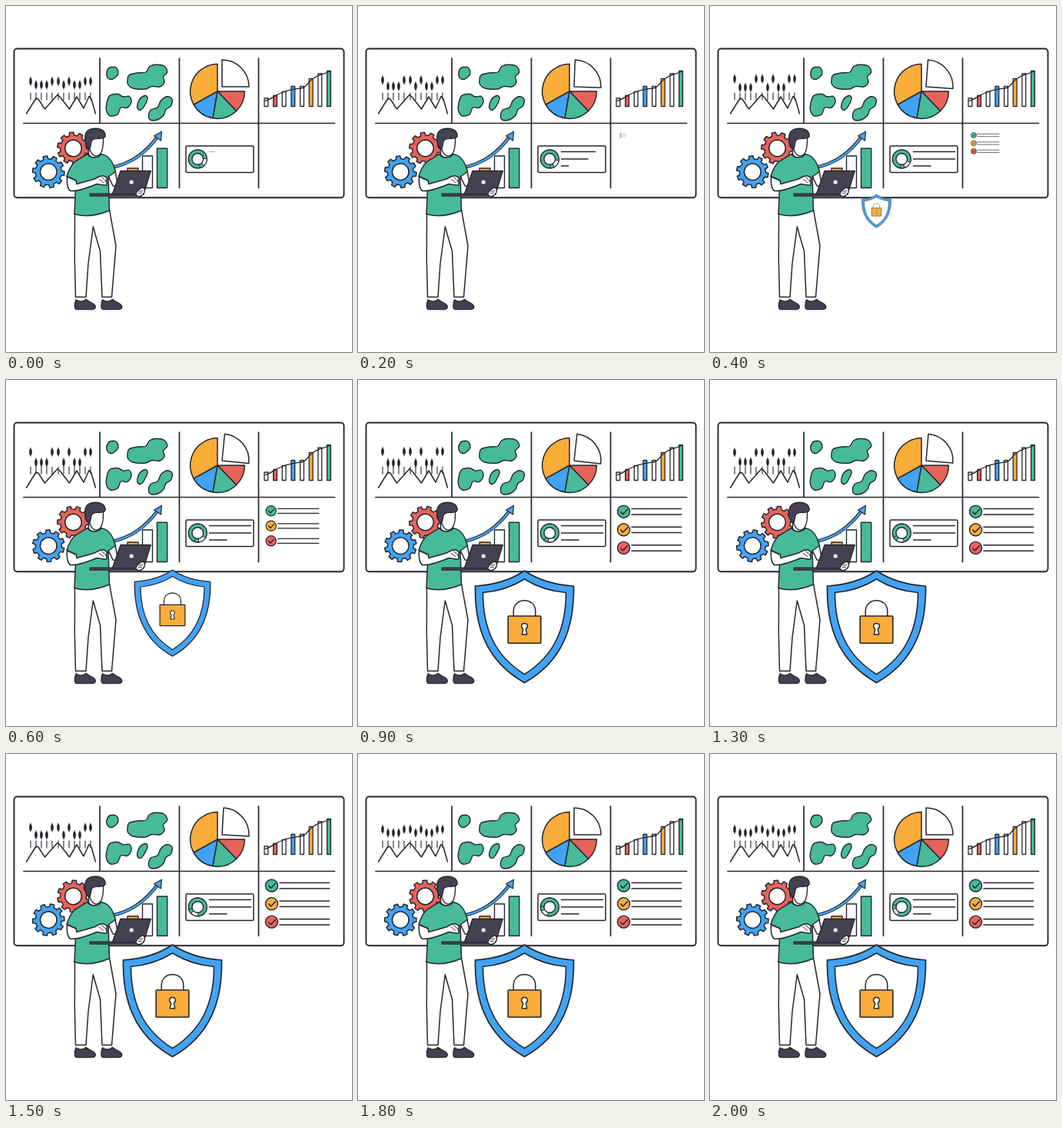
An HTML page with a canvas for the animation above (2.1 s loop, 450 by 450 pixels).

```html
<!DOCTYPE html>
<html lang="en">
<head>
<meta charset="utf-8">
<title>Data dashboard</title>
<style>
html, body { margin: 0; width: 100%; height: 100%; overflow: hidden; background: #fff; }
canvas { display: block; width: 450px; height: 450px; }
</style>
</head>
<body>
<canvas id="stage"></canvas>
<script>
const LOOP = 2100, STEP = 100, TAU = Math.PI * 2;
const INK = '#26262e', DARK = '#434253', WHITE = '#fff';
const GREEN = '#47bb99', BLUE = '#42a3f5', RED = '#e7635a', YELLOW = '#faad38';

const canvas = document.getElementById('stage');
const dpr = window.devicePixelRatio || 1;
canvas.width = canvas.height = Math.round(450 * dpr);
const c = canvas.getContext('2d');

const rad = deg => deg * Math.PI / 180;

function smooth(t, from, to) {
  const p = Math.min(1, Math.max(0, (t - from) / (to - from)));
  return p * p * (3 - 2 * p);
}

function paint(path, fill, width = 1.5) {
  if (fill) { c.fillStyle = fill; c.fill(path); }
  if (width) { c.lineWidth = width; c.strokeStyle = INK; c.stroke(path); }
}

const shape = (d, fill, width) => paint(new Path2D(d), fill, width);

function circle(x, y, r, fill, width) {
  const p = new Path2D();
  p.arc(x, y, r, 0, TAU);
  paint(p, fill, width);
}

function box(x, y, w, h, fill, width, r = 0) {
  const p = new Path2D();
  p.roundRect(x, y, w, h, r);
  paint(p, fill, width);
}

function slice(x, y, r, from, to, fill, width) {
  const p = new Path2D();
  p.moveTo(x, y);
  p.arc(x, y, r, rad(from), rad(to));
  p.closePath();
  paint(p, fill, width);
}

// closed smooth curve through the given points
function blob(pts) {
  const n = pts.length, get = i => pts[(i + n) % n], p = new Path2D();
  p.moveTo(...pts[0]);
  for (let i = 0; i < n; i++) {
    const [a, b, d, e] = [get(i - 1), get(i), get(i + 1), get(i + 2)];
    p.bezierCurveTo(b[0] + (d[0] - a[0]) / 6, b[1] + (d[1] - a[1]) / 6,
      d[0] - (e[0] - b[0]) / 6, d[1] - (e[1] - b[1]) / 6, d[0], d[1]);
  }
  paint(p, GREEN, 1.4);
}

function at(x, y, draw, scale = 1, angle = 0) {
  if (scale <= 0) return;
  c.save();
  c.translate(x, y);
  c.rotate(angle);
  c.scale(scale, scale);
  draw();
  c.restore();
}

function board() {
  box(10.5, 55.5, 429, 193.7, WHITE, 1.9, 4);
  shape('M23 152.5H427.5M122 68V152.5M225.5 68V236.5M328.5 68V236.5', null, 1.7);
}

function candles(swing) {
  const high = [32, 60, 68, 82, 103, 110], low = [39, 46, 53, 75, 89, 96];
  const draw = (x, y) => {
    shape(`M${x} ${y - 5.5}V${y + 5.5}`, null, 1);
    const p = new Path2D();
    p.ellipse(x, y, 1.5, 4.3, 0, 0, TAU);
    paint(p, INK, 0.6);
  };
  high.forEach(x => draw(x, 98 - 5 * swing));
  low.forEach(x => draw(x, 102.5 + 5.5 * swing));
  [...high, ...low].forEach(x => shape(`M${x} 113V122`, null, 1.1));
  shape('M26.5 140L39 120L42 121L50.5 134L67 115.5L70 118L82.5 134L92 118L101 133L108 117.5L111 121L116.5 140', null, 1.5);
}

function islands() {
  blob([[131, 86], [135, 80], [143, 80], [146, 87], [142, 93], [136, 95.5], [131.5, 92]]);
  blob([[158, 97], [160, 90], [171, 87], [182, 86], [186.5, 79], [195, 76.3], [206, 78.5], [209.7, 86],
    [204.5, 92], [206, 99], [200, 105], [189.5, 104.5], [181, 108], [165, 107], [158.5, 102]]);
  blob([[130.5, 129], [134.5, 117], [145, 114.5], [152.5, 118], [160.5, 117.5], [163, 125], [157.8, 132.4],
    [149.5, 132], [145, 141], [136, 143], [130.8, 137]]);
  blob([[170.8, 129], [174, 121], [181, 116.5], [184, 120], [181, 128], [176, 135], [171.5, 134]]);
  blob([[185.4, 143], [188.6, 135], [197, 132], [201.5, 123], [209.5, 117.8], [216, 121], [214.5, 130],
    [208, 134.5], [205, 142], [198, 147.5], [188.6, 148.5]]);
}

function pie(swing) {
  const parts = [[0, 46, RED], [46, 100, GREEN], [100, 151, BLUE], [151, 270, YELLOW]];
  parts.forEach(([a, b, col]) => slice(275, 111, 35.4, a, b, col, 1.5));
  at(281, 105, () => slice(0, 0, 35, -90, 0, WHITE, 1.5), 1, rad(6.5 * swing));
}

function bars() {
  const tops = [120, 116.5, 111.5, 104.5, 104.5, 94.3, 88, 84.5];
  const cols = [WHITE, RED, WHITE, BLUE, WHITE, YELLOW, WHITE, GREEN];
  tops.forEach((y, i) => box(336 + i * 11.65, y, 4.8, 130.5 - y, cols[i], 1.3));
  shape('M337 123.5C345 121 350 116 358 113C365 109 374 108.5 386 106.5C392 104 394 97 400 94C408 88 414 89 421 85', null, 1.3);
}

function gear(x, y, col, angle) {
  const n = 10, p = new Path2D();
  const ring = [[-0.3, 17], [-0.2, 20.8], [0.2, 20.8], [0.3, 17]];
  for (let i = 0; i < n; i++) {
    for (const [k, r] of ring) {
      const a = (i + k) * TAU / n;
      p.lineTo(r * Math.cos(a), r * Math.sin(a));
    }
  }
  p.closePath();
  at(x, y, () => {
    paint(p, col, 1.5);
    circle(0, 0, 10.8, WHITE, 1.5);
  }, 1, angle);
}

function growth() {
  box(158, 211, 14, 25.5, YELLOW, 1.4);
  box(177.5, 195, 13, 41.5, WHITE, 1.4);
  box(196.5, 185.2, 13.2, 51.3, GREEN, 1.4);
  shape('M137 210C160 206 181 192 198 169', null, 4.6);
  c.strokeStyle = BLUE;
  c.lineWidth = 2.3;
  c.stroke(new Path2D('M137 210C160 206 181 192 197 170.5'));
  shape('M192.5 169L202.5 163.3L201.5 175Z', BLUE, 1.2);
}

function card(t) {
  box(234, 182, 88, 34.5, WHITE, 1.5, 1.5);
  const mid = 25 + t * 0.06;
  circle(249.3, 199, 12, GREEN, 1.4);
  slice(249.3, 199, 12, mid - 28, mid + 22, WHITE, 1);
  slice(249.3, 199, 12, mid + 22, mid + 48, GREEN, 1);
  circle(249.3, 199, 7.3, WHITE, 1.4);
  [[189.5, 54], [199, 54], [208, 22.5]].forEach(([y, w], i) => {
    const k = smooth(t, i * 70 - 90, i * 40 + 310);
    if (!k) return;
    c.globalAlpha = Math.min(1, k * 2.5);
    shape(`M264.5 ${y}h${w * k}`, null, 1.5);
    c.globalAlpha = 1;
  });
}

function checklist(t) {
  at(341, 165.6, () => [GREEN, YELLOW, RED].forEach((col, i) => {
    const y = 5.6 + i * 23.6;
    circle(4.5, y, 8, col, 1.4);
    shape(`M0.8 ${y + 0.3}l2.8 3l5.8 -6.2`, null, 1.5);
    shape(`M15 ${y - 3.6}h64.5M15 ${y + 3.8}h64.5`, null, 1.5);
  }), smooth(t, 65, 792));
}

function shield(t) {
  at(216.5, 244, () => {
    shape('M0 4C-19 17 -41 22.5 -64 24C-65 76 -50 122 0 149.7C50 122 65 76 64 24C41 22.5 19 17 0 4Z', BLUE, 1.7);
    shape('M0 15C-17 25.5 -36 31 -54 32.5C-54 77 -40 114 0 138.7C40 114 54 77 54 32.5C36 31 17 25.5 0 15Z', WHITE, 1.6);
    shape('M-14.3 63V57C-14.3 38 14.3 38 14.3 57V63', WHITE, 1.5);
    box(-21.3, 63, 42.6, 35.3, YELLOW, 1.6, 0.8);
    shape('M-1.8 80C-5.5 77 -4 72.5 0 72.5C4 72.5 5.5 77 1.8 80L3.2 87H-3.2Z', WHITE, 1.4);
  }, smooth(t, 180, 790));
}

function person() {
  // legs and shoes
  shape('M89.5 268L89.3 330L90.5 378.5H104L107 335L113.3 287L122.5 319L125 378.5H137.5L143 312L134.5 265Z', WHITE);
  at(0, 0, shoe);
  at(34.5, 0, shoe);
  // far arm
  shape('M133 221L139 234L146 235L142 215Z', WHITE);
  // neck and shirt
  shape('M107.5 182V193C110 199 120 199 123 193V186Z', WHITE);
  shape('M106 192.5C100 196 93 200 89 203C84 208 81 215 79 221.5L91 227L89 270.5C103 275 120 272 134.5 266L133 222L142.5 215.5C140 206 137 200 132 196C129 194 126 193 123.5 192.5C121 198 110 199 106 192.5Z', GREEN);
  // head
  shape('M108 178C107.5 189 113 195.5 118.5 195C124.5 194 127 186 126.5 169H110Z', WHITE, 1.4);
  shape('M106.5 185C102.5 181 101.5 170 104 165C108 157.5 123 157.5 128 164C130 167.5 129.5 170 127 171.5C121 174 116 170.5 112 174.5C110 177 111 181 109 185.5Z', DARK, 1.3);
  // near arm
  shape('M79.5 222C79 230 79 238 84 240.5C92 241.5 108 236 118 231.5L128 233C132 234 132 230.5 130 228C133 226 131 222 127 221C122 220 119 223 115 225L92 231.5L91 227Z', WHITE, 1.5);
  shape('M121 225L127 230M124 222.5L130 227.5', null, 1);
  // laptop
  shape('M109 244H176V247.2H109Z', DARK, 1.1);
  shape('M149 214.5H188.3L179 244.8H138.3Z', DARK, 1.3);
  circle(163.2, 229, 2.6, WHITE, 0);
  shape('M169 245C169 241 173 239 177 236C181 236 181.5 241 178.5 245C175 249 170 248 169 245Z', WHITE, 1.3);
  shape('M173 241.5L178 240M172 244L177 243', null, 0.9);
}

function shoe() {
  shape('M91 382C95 385 101 385 104 381.5C108 386 116 386 116.3 391C116.3 394 114 394.6 111 394.6H92C88.5 394.6 89 387 91 382Z', DARK, 1.4);
}

function render(now) {
  const t = Math.floor(now % LOOP / STEP) * STEP;
  const swing = t < 1800 ? Math.sin(Math.PI * t / 1800) : 0;
  const turn = t / LOOP * TAU / 10;
  c.setTransform(dpr, 0, 0, dpr, 0, 0);
  c.fillStyle = WHITE;
  c.fillRect(0, 0, 450, 450);
  c.lineJoin = c.lineCap = 'round';
  board();
  candles(swing);
  islands();
  pie(swing);
  bars();
  gear(87.5, 185, RED, 0.2 - turn);
  gear(55.3, 215.7, BLUE, 0.1 + turn);
  growth();
  card(t);
  checklist(t);
  shield(t);
  person();
}

const start = performance.now();
function tick() {
  render(performance.now() - start);
  requestAnimationFrame(tick);
}
tick();
</script>
</body>
</html>
```
